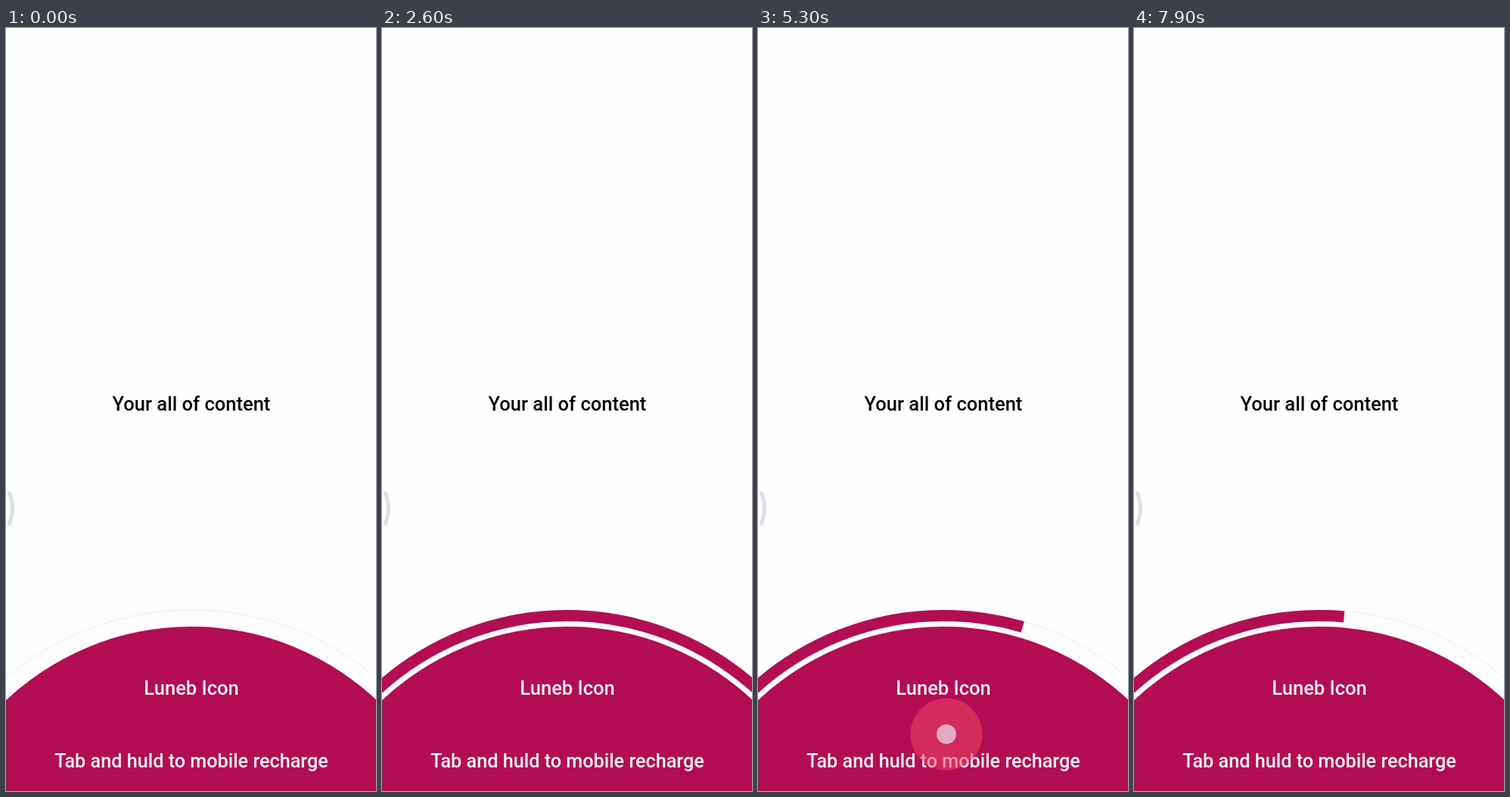
Animation of 489x1007 px, one loop 8000 ms. Source, as an HTML page:

```html
<!DOCTYPE html>
<html lang="en">
<head>
<meta charset="utf-8">
<title>Tap and hold</title>
<style>
  html, body { margin: 0; width: 100%; height: 100%; overflow: hidden; background: #fefdff; }
  svg { display: block; width: 489px; height: 1007px; }
  text { font: 500 25.5px Roboto, sans-serif; text-anchor: middle; fill: #fdf5f9; }
  .content { fill: #050507; }
  .hint { font-size: 25.2px; }
  .track { fill: none; stroke: #dcdcec; stroke-width: .5; }
  .disc { fill: #b30d53; }
  .progress { fill: none; stroke: #b30d53; stroke-width: 15; }
  .handle { fill: none; stroke: #dfdee3; stroke-width: 5; stroke-linecap: round; }
</style>
</head>
<body>
<svg viewBox="0 0 489 1007">
  <text class="content" x="245" y="505">Your all of content</text>
  <path class="handle" d="M4.5 614Q12.5 634 4.5 654"/>
  <circle class="track" cx="245" cy="1147" r="379"/>
  <path class="progress" id="progress" pathLength="1" d="M-126.5 1147A371.5 371.5 0 0 1 616.5 1147"/>
  <circle class="disc" cx="245" cy="1147" r="357"/>
  <rect x="0" y="887" width="1" height="120" fill="#5a3f4d" opacity=".7"/>
  <text x="245" y="880">Luneb Icon</text>
  <text class="hint" x="245" y="976">Tab and huld to mobile recharge</text>
  <g id="touch" opacity="0">
    <circle id="halo" r="47" fill="#f04366" fill-opacity=".82"/>
    <circle r="13" fill="#fff"/>
  </g>
</svg>
<script>
const LOOP = 8000, STEP = 100;
const FADE_IN = 60, FADE_OUT = 100;

// Progress of the half ring: [time, value], linear in between.
const fillKeys = [
  [0, 0], [1094, 0], [2094, 1], [2472, 1], [3290, .182], [3837, .729],
  [4566, 0], [4709, 0], [5415, .706], [6121, 0], [6450, 0], [7439, .989], [8000, .428]
];

const presses = [
  { down: 970, up: 2370, x: 237, y: 925, r: 48 },
  { down: 3190, up: 3740, x: 246, y: 925, r: 46.5 },
  { down: 4590, up: 5265, x: 249, y: 932, r: 47.5 },
  { down: 6335, up: 7340, x: 246, y: 930, r: 47 }
];

const progress = document.getElementById('progress');
const touch = document.getElementById('touch');
const halo = document.getElementById('halo');
const clamp = v => Math.min(1, Math.max(0, v));

function fillAt(t) {
  const i = fillKeys.findIndex(key => key[0] > t);
  const [t0, v0] = fillKeys[i - 1], [t1, v1] = fillKeys[i];
  return v0 + (v1 - v0) * (t - t0) / (t1 - t0);
}

function drawTouch(t) {
  const press = presses.find(p => t >= p.down && t < p.up + FADE_OUT);
  if (!press) return touch.setAttribute('opacity', 0);
  const { down, up, x, y, r } = press;
  const opacity = Math.min(clamp((t - down) / FADE_IN), clamp(1 - (t - up) / FADE_OUT));
  touch.setAttribute('opacity', opacity);
  touch.setAttribute('transform', `translate(${x} ${y})`);
  halo.setAttribute('r', r);
}

function draw(now) {
  // The picture advances in tenths of a second, with a small allowance for display lag.
  const t = Math.floor((now + 20) / STEP) * STEP % LOOP;
  progress.setAttribute('stroke-dasharray', `${fillAt(t)} 2`);
  drawTouch(t);
  requestAnimationFrame(draw);
}
draw(performance.now());
</script>
</body>
</html>
```
